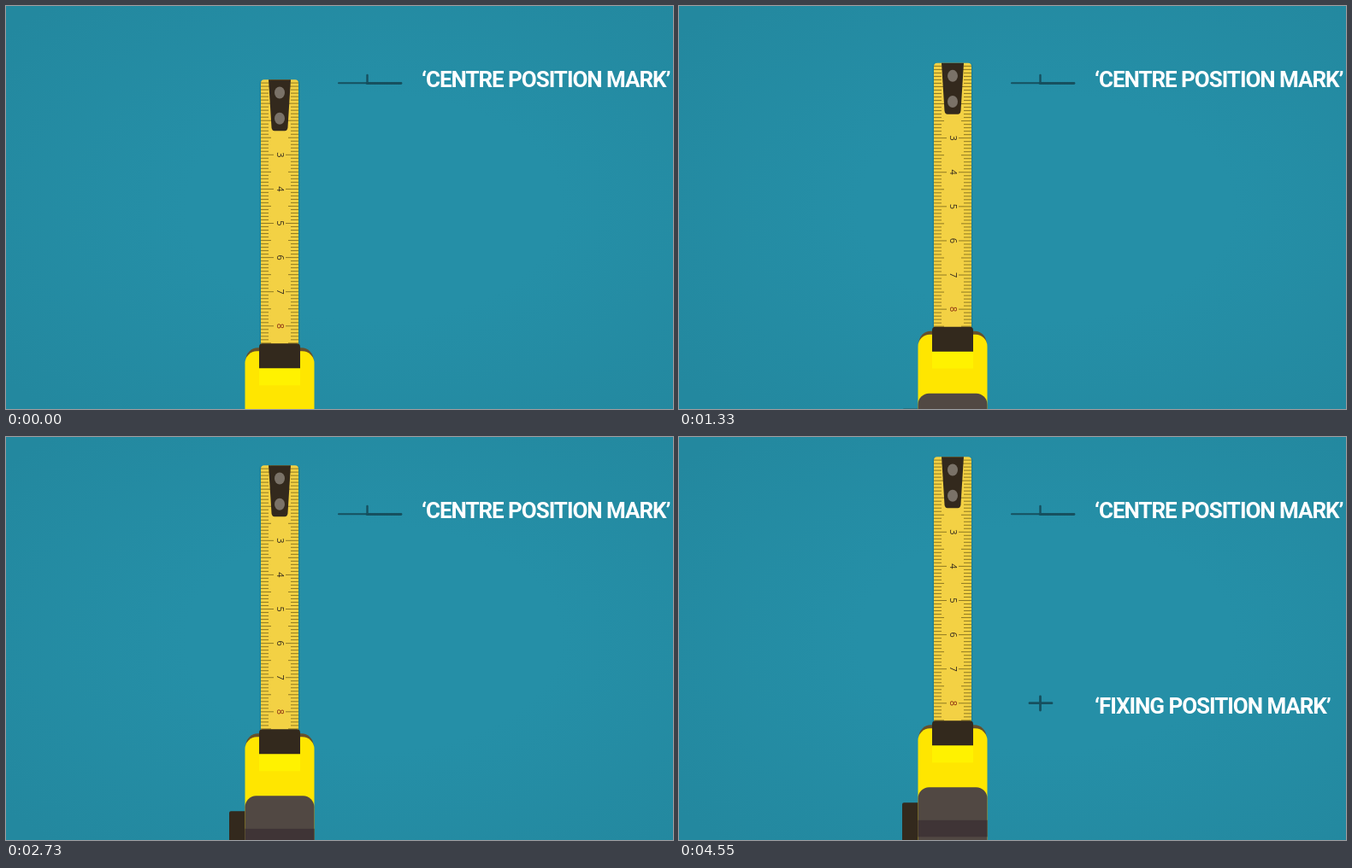
An HTML page that plays this animation: 780 px wide and 472 px high, repeating every 4.62 s.

```html
<!DOCTYPE html>
<html lang="en">
<head>
<meta charset="utf-8">
<title>Tape measure</title>
<style>
html, body { margin: 0; width: 100%; height: 100%; overflow: hidden; background: #258ea6; }
svg { display: block; width: 780px; height: 472px; }
.label { font: 700 26px Roboto, "Liberation Sans", sans-serif; letter-spacing: -1.05px; fill: #fff; }
.digit { font: 11px "Open Sans", sans-serif; text-anchor: middle; }
.mark { stroke: #16505f; stroke-linecap: round; filter: url(#soft); }
</style>
</head>
<body>
<svg viewBox="0 0 780 472">
  <defs>
    <radialGradient id="bg" cx="55%" cy="50%" r="70%">
      <stop offset="0.4" stop-color="#258fa7"/>
      <stop offset="1" stop-color="#23889f"/>
    </radialGradient>
    <filter id="soft" filterUnits="userSpaceOnUse" x="370" y="60" width="110" height="280">
      <feGaussianBlur stdDeviation="0.6"/>
    </filter>
    <filter id="shade" filterUnits="userSpaceOnUse" x="250" y="-10" width="120" height="600">
      <feGaussianBlur stdDeviation="1.2"/>
    </filter>
  </defs>
  <rect width="780" height="472" fill="url(#bg)"/>

  <g class="mark">
    <path d="M389 90.3H422" stroke-width="2"/>
    <path d="M422 90.5H462" stroke-width="2.8"/>
    <path d="M422.5 81V90" stroke-width="2.4"/>
  </g>
  <text class="label" x="486" y="94.5">‘CENTRE POSITION MARK’</text>

  <g id="cross" class="mark" stroke-width="2.8">
    <path id="across" d="M410 311.7H436"/>
    <path id="down" d="M422.5 304V320"/>
  </g>
  <text id="fixing" class="label" x="486" y="323.5">‘FIXING POSITION MARK’</text>

  <g id="tape">
    <path d="M298 2H342V310H298Z" fill="#0b4353" opacity=".6" filter="url(#shade)"/>
    <path d="M298 312V4Q298 0 302 0H338Q342 0 342 4V312Z" fill="#f3d144"/>
    <path id="ticks" stroke="#85701f" stroke-width=".9"/>
    <g id="digits"></g>
    <path d="M307 0H333L329.5 56Q329 60 326 60H314Q311 60 310.5 56Z" fill="#33291d"/>
    <g fill="#7a7268">
      <ellipse cx="320" cy="15.2" rx="6" ry="7"/>
      <ellipse cx="320" cy="45.4" rx="6" ry="7"/>
    </g>
    <rect x="261" y="405" width="24" height="150" rx="2" fill="#33291d"/>
    <rect x="280.5" y="314" width="79" height="100" rx="14" fill="#66502b"/>
    <rect x="279.5" y="318" width="81" height="180" rx="14" fill="#ffe600"/>
    <rect x="296" y="338" width="48" height="20" fill="#fff200"/>
    <path d="M296 338V313Q296 309 300 309H340Q344 309 344 313V338Z" fill="#33291d"/>
    <rect x="279.5" y="387" width="81" height="180" rx="13" fill="#514843"/>
    <rect x="279.5" y="425.5" width="81" height="19.5" fill="#3f3436"/>
  </g>
</svg>
<script>
const LOOP = 4620, STEP = 70, CM = 40.1, THREE = 88;
const $ = id => document.getElementById(id);
const ramp = (t, from, to) => Math.min(1, Math.max(0, (t - from) / (to - from)));

// Millimetre ticks on both edges, longer at each half and whole unit
let ticks = "";
for (let i = -21; i <= 55; i++) {
  const y = (THREE + i * CM / 10).toFixed(2);
  const len = i % 10 === 0 ? 15 : i % 5 === 0 ? 12 : 9;
  ticks += `M298 ${y}h${len}M342 ${y}h${-len}`;
}
$("ticks").setAttribute("d", ticks);

let digits = "";
for (let n = 3; n <= 8; n++) {
  const y = THREE + (n - 3) * CM;
  const fill = n === 8 ? "#8a2c12" : "#33291d";
  digits += `<text class="digit" fill="${fill}" transform="translate(316.5 ${y}) rotate(90)">${n}</text>`;
}
$("digits").innerHTML = digits;

function draw(now) {
  const t = Math.floor(now % LOOP / STEP) * STEP;
  const top = 86.3 - 63 * ramp(t, 504, 3151);
  $("tape").setAttribute("transform", `translate(0 ${top.toFixed(2)})`);

  const h = 26 * ramp(t, 3430, 3640), v = 16 * ramp(t, 3640, 3780);
  $("across").setAttribute("d", h ? `M410 311.7h${h}` : "");
  $("down").setAttribute("d", v ? `M422.5 304v${v}` : "");
  $("fixing").setAttribute("opacity", ramp(t, 3640, 3920));
}

const start = performance.now();
function frame() {
  draw(performance.now() - start);
  requestAnimationFrame(frame);
}
frame();
</script>
</body>
</html>
```
